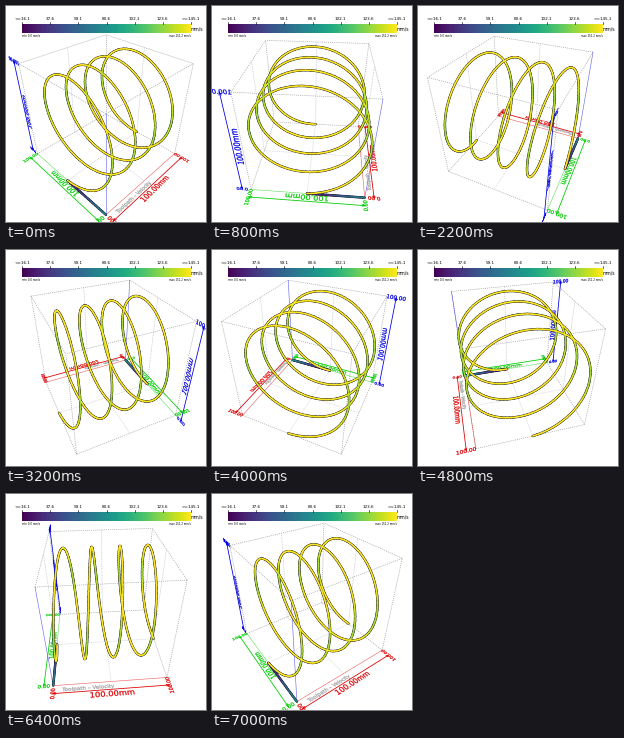
Write a matplotlib script that moves like this. It is 200 px wide and 216 px high and loops after 7200 ms.

```python
import numpy as np
import matplotlib.pyplot as plt
from matplotlib.animation import FuncAnimation
from matplotlib.collections import LineCollection
from matplotlib.patches import PathPatch
from matplotlib.path import Path
from matplotlib.textpath import TextPath

W, H, DPI = 200, 216, 100
PX = 72 / DPI  # one pixel in points
FRAMES, INTERVAL = 36, 200
ELEV = np.arctan(1 / np.sqrt(2))
DIST = 240
FOCAL = H / 2 / np.tan(np.radians(22.5))
SIZE, MID, GAP = 100, 50, 8  # box side, its half, distance of the rulers
VMIN, VMAX = 16.1, 145.1
RED, GREEN, BLUE, GRAY = "#dd0000", "#00cc00", "#0000e0", "#a4a4a4"
EX, EY, EZ = np.eye(3)
DOTTED = (0, (1.5, 1.5))

fig = plt.figure(figsize=(W / DPI, H / DPI), dpi=DPI, facecolor="white")
ax = fig.add_axes([0, 0, 1, 1])
ax.axis("off")
viridis = plt.get_cmap("viridis")


def project(points, angle):
    """Perspective view of world points, orbiting the box centre."""
    p = np.asarray(points, float) - MID
    x, y, z = p[..., 0], p[..., 1], p[..., 2]
    b = angle + np.pi / 4
    side = x * np.cos(b) - y * np.sin(b)
    near = -x * np.sin(b) - y * np.cos(b)
    c, s = np.cos(ELEV), np.sin(ELEV)
    scale = FOCAL / (DIST - near * c - z * s)
    return np.stack([W / 2 + side * scale, H / 2 - (z * c - near * s) * scale], -1)


lines = []       # (collection, world segments)
labels = []      # (patch, world vertices, path codes)
back_lines = []  # (collection, outward normal of its wall)


def add_lines(segments, color, width, zorder, style="solid", cap="butt", alpha=None):
    segments = np.asarray(segments, float)
    item = LineCollection([], colors=color, linewidths=width * PX, alpha=alpha,
                          linestyles=style, capstyle=cap, zorder=zorder)
    ax.add_collection(item)
    lines.append((item, segments))
    return item


def add_label(text, center, right, up, size, color):
    """Flat text lying in the world plane spanned by right and up."""
    path = TextPath((0, 0), text, size=size, prop={"family": "DejaVu Sans"})
    box = path.get_extents()
    flat = path.vertices - [(box.x0 + box.x1) / 2, (box.y0 + box.y1) / 2]
    world = np.asarray(center) + flat[:, :1] * right + flat[:, 1:] * up
    patch = PathPatch(Path(flat, path.codes), fc=color, ec=color,
                      lw=0.25 * PX, zorder=3)
    ax.add_patch(patch)
    labels.append((patch, world, path.codes))


def add_ruler(start, axis, out, up, end_right, end_up, color):
    """Dimension line with arrowheads, length text and end values."""
    start = np.asarray(start, float)
    end = start + SIZE * axis
    segments = [(start, end)]
    for tip, way in ((start, axis), (end, -axis)):
        segments += [(tip, tip + 3 * way + k * 0.8 * out) for k in (-1, 1)]
    add_lines(segments, color, 0.8, 2)
    add_label("100.00mm", (start + end) / 2 - 4 * up, axis, up, 7, color)
    add_label("0.00", start, end_right, end_up, 4.8, color)
    add_label("100.00", end, end_right, end_up, 4.8, color)


# Box: dotted edges, the three through the origin coloured
edges = []
for axis in np.eye(3):
    others = [e for e in np.eye(3) if not np.array_equal(e, axis)]
    for i in (0, 1):
        for j in (0, 1):
            if i or j:
                a = SIZE * (i * others[0] + j * others[1])
                edges.append((a, a + SIZE * axis))
add_lines(edges, "#a0a0a0", 0.7, 1, DOTTED)
for axis, color in ((EX, RED), (EY, GREEN), (EZ, BLUE)):
    add_lines([(0 * axis, SIZE * axis)], color, 0.6, 1, alpha=0.6)

# Faint centre lines on the floor and on the walls facing away
add_lines([(MID * EX, MID * EX + SIZE * EY), (MID * EY, MID * EY + SIZE * EX)],
          "#c4c4d0", 0.6, 1, DOTTED)
for normal in (EX, -EX, EY, -EY):
    foot = MID * (EX + EY + normal)
    item = add_lines([(foot, foot + SIZE * EZ)], "#b4b4c8", 0.6, 1, DOTTED)
    back_lines.append((item, normal))

add_ruler((0, -GAP, 0), EX, EY, EY, EY, -EX, RED)
add_ruler((-GAP, 0, 0), EY, EX, -EX, EX, EY, GREEN)
add_ruler((0, SIZE + GAP, 0), EZ, EY, EY, EY, EZ, BLUE)
add_label("Toolpath – Velocity", (30, -5, 0), EX, EY, 4.8, GRAY)

# Path: slow lead-in from the origin, then four turns around the x direction
u = np.linspace(0, 1, 25)
lead = np.stack([0 * u, MID * u, 0 * u], -1)
theta = np.linspace(0, 8 * np.pi, 321)
coil = np.stack([SIZE * theta / theta[-1],
                 MID - MID * np.sin(theta),
                 MID - MID * np.cos(theta)], -1)
track = np.concatenate([lead, coil[1:]])
speed = np.concatenate([VMIN + 60 * (1 - u[1:]),
                        VMAX - 18 * np.sin(theta[1:]) ** 12])
steps = np.stack([track[:-1], track[1:]], 1)
add_lines(steps, "#101010", 2.4, 4, cap="round")
add_lines(steps, viridis((speed - VMIN) / (VMAX - VMIN)), 1.6, 5, cap="round")

# Colour scale
LEFT, RIGHT, TOP, BOTTOM = 16, 185, 18, 27
ax.imshow(np.linspace(0, 1, 256)[None], cmap=viridis, aspect="auto",
          extent=(LEFT, RIGHT, BOTTOM, TOP), zorder=6)


def note(x, y, text, size, align="center"):
    ax.text(x, y, text, fontsize=size * PX, ha=align, va="center",
            color="black", family="DejaVu Sans", zorder=7)


for i in range(7):
    x = LEFT + (RIGHT - LEFT) * i / 6
    sign = {0: "<=", 6: ">="}.get(i, "")
    note(x, 13, f"{sign}{VMIN + 21.5 * i:.1f}", 4.1)
    ax.plot([x, x], [16, TOP], color="black", lw=0.6 * PX, zorder=7)
note(184.5, 23, "mm/s", 4.5, "left")
note(LEFT, 30, "min 0.0 mm/s", 2.6, "left")
note(RIGHT, 30, "max 151.2 mm/s", 2.6, "right")
ax.set_xlim(0, W)
ax.set_ylim(H, 0)


def update(frame):
    angle = 2 * np.pi * frame / FRAMES
    for item, segments in lines:
        item.set_segments(project(segments, angle))
    for patch, world, codes in labels:
        patch.set_path(Path(project(world, angle), codes))
    b = angle + np.pi / 4
    eye = DIST * np.cos(ELEV) * np.array([-np.sin(b), -np.cos(b), 0])
    for item, normal in back_lines:
        item.set_visible(eye @ normal < MID)
    return []


anim = FuncAnimation(fig, update, frames=FRAMES, interval=INTERVAL,
                     repeat=True, repeat_delay=0, blit=False)
plt.show()
```
